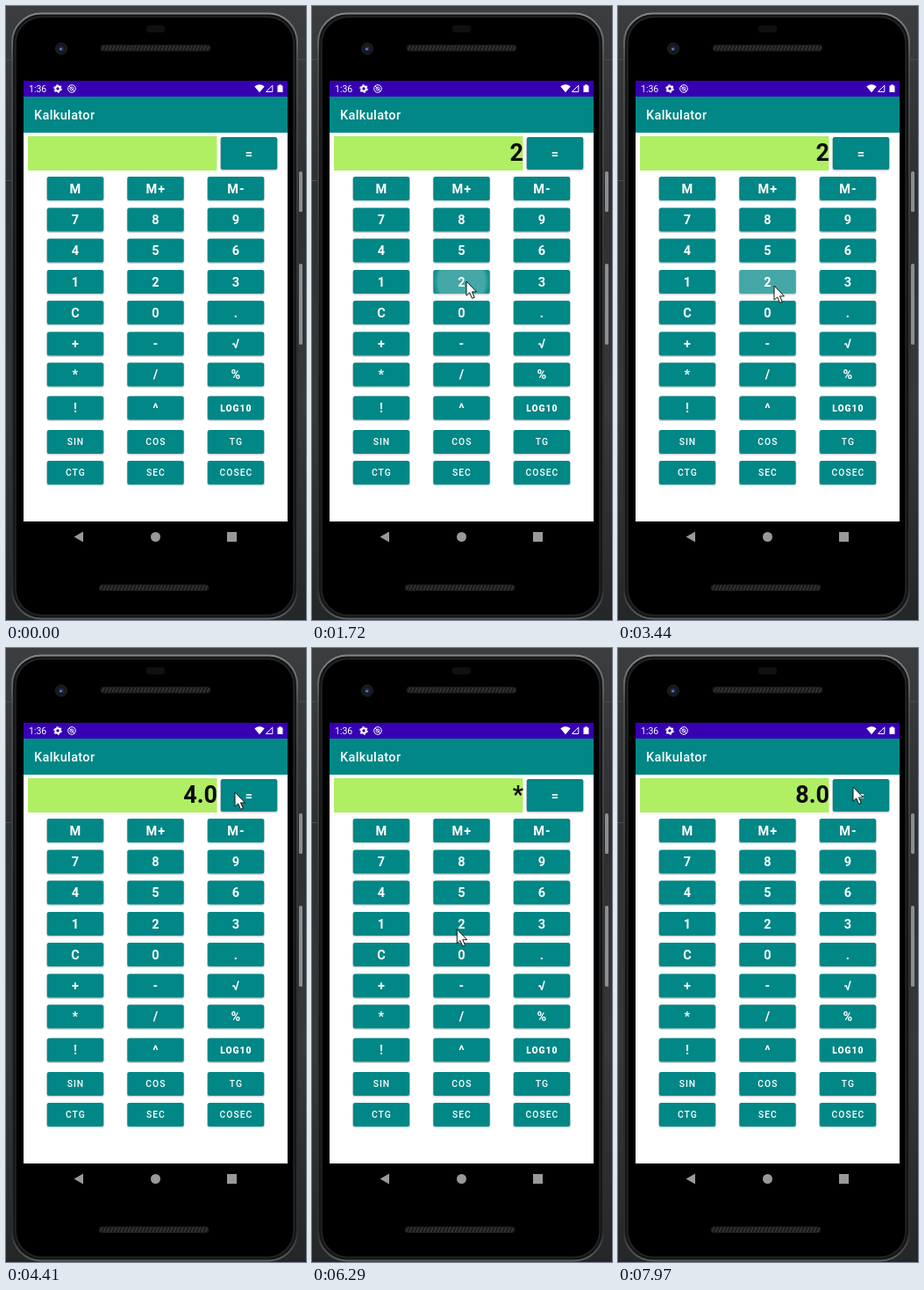
An HTML page for the animation above (8 s loop, 342x698 px).

```html
<!DOCTYPE html>
<html lang="pl">
<head>
<meta charset="utf-8">
<title>Kalkulator</title>
<style>
html, body { margin: 0; width: 100%; height: 100%; overflow: hidden; background: #2b2d2f; }
svg { display: block; width: 100vw; height: 100vh; }
text { font-family: Roboto, sans-serif; }
</style>
</head>
<body>
<svg id="stage" viewBox="0 0 342 698">
  <defs>
    <linearGradient id="wall" x2="0" y2="1">
      <stop offset="0" stop-color="#3b3d3f"/><stop offset=".3" stop-color="#2d2f31"/>
      <stop offset=".65" stop-color="#36383a"/><stop offset="1" stop-color="#242628"/>
    </linearGradient>
    <linearGradient id="rim" x2="0" y2="1">
      <stop offset="0" stop-color="#85898b"/><stop offset=".08" stop-color="#4a4d4f"/>
      <stop offset=".5" stop-color="#2e3032"/><stop offset=".95" stop-color="#2a2c2e"/>
      <stop offset="1" stop-color="#5c6062"/>
    </linearGradient>
    <radialGradient id="glow">
      <stop offset=".84" stop-color="#fff"/><stop offset="1" stop-color="#fff" stop-opacity="0"/>
    </radialGradient>
    <pattern id="mesh" width="4" height="4" patternUnits="userSpaceOnUse" patternTransform="skewX(-25)">
      <rect width="4" height="4" fill="#171717"/><rect width="1.700" height="4" fill="#373737"/>
    </pattern>
    <clipPath id="keyClip"><rect id="clipBox" rx="2.5"/></clipPath>
  </defs>

  <rect width="342" height="698" fill="url(#wall)"/>
  <rect width="342" height="5" fill="#3b3d3f"/>
  <path d="M0 61h8M0 198.500h8M332 61h10" stroke="#4c4f51"/>
  <rect x="334" y="188" width="4" height="46" rx="1.500" fill="#8b8e90"/>
  <rect x="334" y="293" width="4" height="92" rx="1.500" fill="#8b8e90"/>
  <rect x="7" y="8.500" width="325" height="688" rx="33" fill="#151617" stroke="url(#rim)" stroke-width="2"/>
  <rect x="11" y="12.500" width="317" height="680" rx="30" fill="#000" stroke="#242628" stroke-width="1.500"/>
  <rect x="160" y="22" width="21" height="8" rx="3" fill="#101010"/>
  <rect x="108" y="44.500" width="125" height="6.500" rx="3.200" fill="url(#mesh)" stroke="#1c1c1c"/>
  <rect x="106" y="658" width="125" height="6.500" rx="3.200" fill="url(#mesh)" stroke="#1c1c1c"/>
  <circle cx="63" cy="48.500" r="6.500" fill="#15181c" stroke="#222428"/>
  <circle cx="63" cy="48.500" r="3" fill="#1d2b4a"/>
  <circle cx="62.500" cy="49" r="1.300" fill="#7089bd"/>

  <rect x="20" y="85" width="301" height="501" fill="#fff"/>
  <rect x="20" y="85" width="301" height="18.500" fill="#3700b3"/>
  <rect x="20" y="103" width="301" height="41" fill="#018786"/>
  <rect x="25" y="148" width="215.500" height="39" fill="#b0ee64"/>
  <text x="26" y="97.700" font-size="10.500" fill="#fff">1:36</text>
  <text x="32" y="129" font-size="14.500" font-weight="500" letter-spacing=".35" fill="#fff">Kalkulator</text>

  <g fill="none" stroke="#fff">
    <circle cx="59" cy="94" r="2.700" stroke-width="2"/>
    <circle cx="59" cy="94" r="4.200" stroke-width="1.300" stroke-dasharray="2.200 2.198"/>
    <circle cx="75" cy="94" r="4.300"/>
    <circle cx="75" cy="94" r="2" stroke-width=".9"/>
    <path d="M72 91l6 6"/>
    <path d="M296.500 97.500h7.300v-7.300z"/>
  </g>
  <path d="M283.300 91.500q5.700-4.500 11.400 0l-5.700 6.700zM309.500 90.500h1.500v-1h3v1h1.500v7.500h-6z" fill="#fff"/>
  <path d="M88 597.500v12l-10.500-6z" fill="#999"/>
  <circle cx="170.500" cy="603.500" r="5.500" fill="#999"/>
  <rect x="252" y="598" width="11" height="11" fill="#999"/>

  <g id="keys"></g>
  <g clip-path="url(#keyClip)">
    <rect id="tint" width="342" height="698" fill="#fff" opacity="0"/>
    <circle id="ripple" fill="url(#glow)"/>
  </g>
  <g id="labels" fill="#fff" text-anchor="middle"></g>
  <text id="display" x="241" y="176" font-size="27" font-weight="700" text-anchor="end" fill="#0c0c0c"></text>
  <path id="cursor" d="M0 0V16.200L3.700 12.900L6.500 19.400L9.300 18.200L6.500 11.900H11.500Z"
        fill="#fff" stroke="#111" stroke-linejoin="round"/>
</svg>
<script>
const LOOP = 8000;
const $ = id => document.getElementById(id);

function add(parent, tag, attrs, content) {
  const el = document.createElementNS('http://www.w3.org/2000/svg', tag);
  set(el, attrs);
  if (content) el.textContent = content;
  parent.append(el);
}
function set(el, attrs) {
  for (const name in attrs) el.setAttribute(name, attrs[name]);
}

const rows = ['M M+ M-', '7 8 9', '4 5 6', '1 2 3', 'C 0 .', '+ - √', '* / %',
  '! ^ LOG10', 'SIN COS TG', 'CTG SEC COSEC'];
const rowY = [207.5, 243, 278, 313.5, 348.5, 384, 419, 457, 495.5, 530.5];
const keys = {};

const digitStyle = { 'font-size': 14.5, 'font-weight': 700 };
const logStyle = { 'font-size': 10.3, 'font-weight': 900 };
const trigStyle = { 'font-size': 10.3, 'font-weight': 500 };

function addKey(label, cx, cy, h, style) {
  const box = { x: cx - 32.2, y: cy - h / 2, width: 64.4, height: h };
  keys[label] = { ...box, cx, cy };
  const round = { ...box, rx: 2.5 };
  add($('keys'), 'rect', {
    ...round, y: box.y + 0.8, stroke: '#000', 'stroke-width': 1.4, opacity: 0.16
  });
  add($('keys'), 'rect', { ...round, fill: '#018786' });
  add($('labels'), 'text', {
    x: cx + 0.4, y: cy + style['font-size'] * 0.355,
    'letter-spacing': 1, ...style
  }, label);
}

rows.forEach((row, r) => row.split(' ').forEach((label, c) => {
  const style = r > 7 ? trigStyle : label === 'LOG10' ? logStyle : digitStyle;
  addKey(label, 79 + 91.5 * c, rowY[r], 27, style);
}));
addKey('=', 277, 167.5, 37, digitStyle);

// Cursor stops: time, x, y
const path = [
  [220, 320, 584], [880, 179, 312], [1400, 176, 313], [1850, 176, 313],
  [2400, 86, 380], [2850, 86, 380], [3150, 178, 318], [3560, 178, 318],
  [3880, 261, 164], [4480, 261, 164], [5050, 86, 408], [5200, 86, 411],
  [5980, 86, 411], [6270, 165, 320], [6420, 170, 315], [6860, 170, 315],
  [7260, 268, 158], [8000, 268, 158]
];

// Presses: time, key, resulting display
const presses = [
  [1600, '2', '2'], [2660, '+', '+'], [3200, '2', '2'], [3950, '=', '4.0'],
  [5380, '*', '*'], [6480, '2', '2'], [7380, '=', '8.0']
];

const clamp = v => Math.max(0, Math.min(1, v));
const mix = (a, b, k) => a + (b - a) * k;

function cursorAt(t) {
  const i = path.findIndex(p => p[0] > t);
  if (i < 1) return null;
  const [t0, x0, y0] = path[i - 1], [t1, x1, y1] = path[i];
  const u = (t - t0) / (t1 - t0), k = u * u * (3 - 2 * u);
  return [mix(x0, x1, k), mix(y0, y1, k)];
}

function renderPress(t) {
  const press = presses.find(p => t >= p[0] && t < p[0] + 440);
  const age = press ? t - press[0] : 0;
  const fade = clamp(age / 70) * clamp((440 - age) / 150);
  set($('tint'), { opacity: 0.06 * fade });
  set($('ripple'), { opacity: 0.22 * fade });
  if (!press) return;
  const { cx, cy, x, y, width, height } = keys[press[1]];
  set($('clipBox'), { x, y, width, height });
  set($('ripple'), { cx, cy, r: 6 + 36 * clamp(age / 170) });
}

function render(t) {
  const pos = cursorAt(t);
  set($('cursor'), {
    visibility: pos ? 'visible' : 'hidden',
    transform: `translate(${pos || [0, 0]})`
  });
  const shown = presses.filter(p => t >= p[0] + 90).pop();
  $('display').textContent = shown ? shown[2] : '';
  renderPress(t);
}

function tick(now) {
  render(now % LOOP);
  requestAnimationFrame(tick);
}
render(0);
requestAnimationFrame(tick);
</script>
</body>
</html>
```
